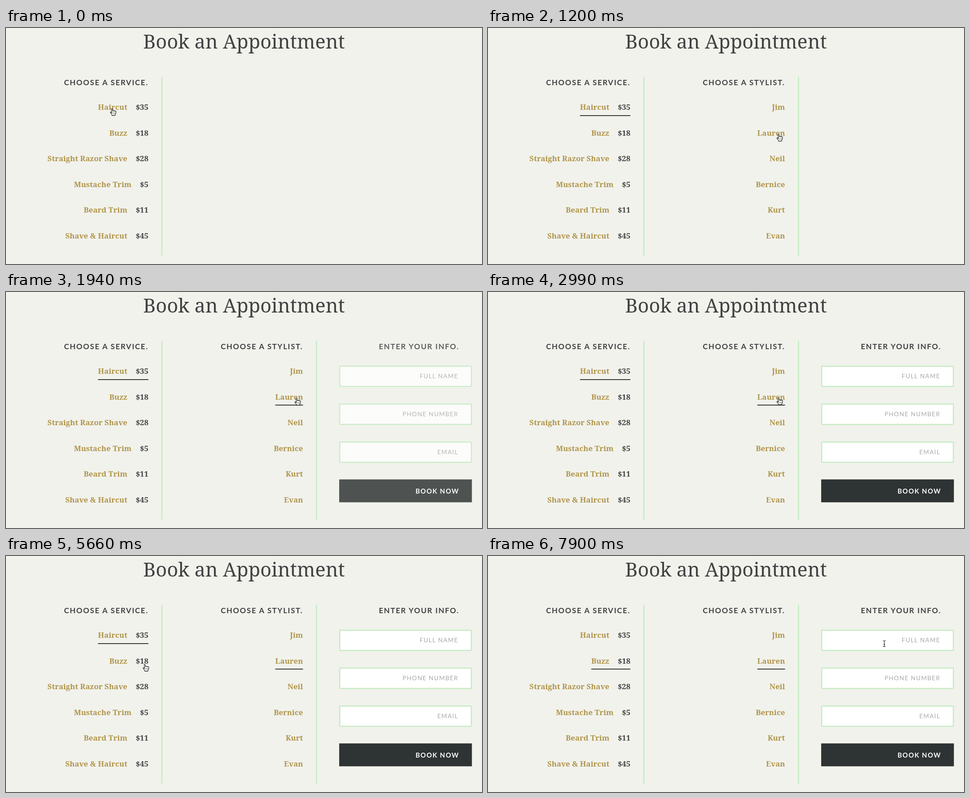
Write an HTML page that moves like this. It is 1060 by 528 pixels and loops after 8000 ms.

```html
<!DOCTYPE html>
<html lang="en">
<head>
<meta charset="utf-8">
<title>Book an Appointment</title>
<style>
  html, body { margin: 0; width: 100%; height: 100%; overflow: hidden; background: #f1f2ec; }
  svg { display: block; width: 1060px; height: 528px; }
  text { fill: #414242; }
  .title { font: 43.1px "Noto Serif", serif; text-anchor: middle; }
  .head, .hint, .button { font-family: Lato, sans-serif; letter-spacing: .1em; text-anchor: end; }
  .head { font-size: 16.8px; font-weight: 700; }
  .hint { font-size: 13.44px; fill: #a9a9a9; }
  .button { font-size: 14.7px; font-weight: 700; fill: #fff; }
  .item, .price { font: 700 16.8px "Noto Serif", serif; text-anchor: end; }
  .item { fill: #b1954b; }
  .rule { fill: #c5ebc3; }
  .field { fill: #fff; stroke: #c5ebc3; stroke-width: 2.5; }
  .under { fill: #393c3c; }
</style>
</head>
<body>
<svg id="stage" viewBox="0 0 1060 528"></svg>
<script>
const LOOP = 8000;
const stage = document.getElementById('stage');

function add(parent, tag, attrs = {}, text = '') {
  const el = document.createElementNS('http://www.w3.org/2000/svg', tag);
  for (const key in attrs) el.setAttribute(key, attrs[key]);
  el.textContent = text;
  return parent.appendChild(el);
}
const group = () => add(stage, 'g');
const label = (parent, cls, x, y, text) => add(parent, 'text', { class: cls, x, y }, text);
const box = (parent, cls, x, y, width, height, more) =>
  add(parent, 'rect', { class: cls, x, y, width, height, ...more });

// A list of choices; returns one underline per row.
function list(parent, right, heading, rows) {
  label(parent, 'head', right, 128, heading);
  box(parent, 'rule', right + 28.8, 109, 2.6, 400);
  return rows.map(([name, price], i) => {
    const y = 183 + i * 57.5;
    const end = price ? right - price.length * 9.4 - 18.7 : right;
    const item = label(parent, 'item', end, y, name);
    if (price) label(parent, 'price', right, y, price);
    const left = end - item.getComputedTextLength();
    return box(parent, 'under', left, Math.floor(y + 12), right - left, 2, { opacity: 0 });
  });
}

label(stage, 'title', 530, 46, 'Book an Appointment');
const services = group(), stylists = group(), info = group();

const [haircut, buzz] = list(services, 317.1, 'CHOOSE A SERVICE.', [
  ['Haircut', '$35'], ['Buzz', '$18'], ['Straight Razor Shave', '$28'],
  ['Mustache Trim', '$5'], ['Beard Trim', '$11'], ['Shave & Haircut', '$45']
]);
const [first, second] = list(stylists, 661.4, 'CHOOSE A STYLIST.',
  [['Jim'], ['Lauren'], ['Neil'], ['Bernice'], ['Kurt'], ['Evan']]);

label(info, 'head', 1009.2, 128, 'ENTER YOUR INFO.');
['FULL NAME', 'PHONE NUMBER', 'EMAIL'].forEach((hint, i) => {
  const y = 164.7 + i * 84.9;
  box(info, 'field', 743.2, y + 1.2, 293.1, 45.4, { rx: 2 });
  label(info, 'hint', 1007.2, y + 28.6, hint);
});
box(info, '', 742, 419.3, 295.5, 51.2, { fill: '#2e3334' });
label(info, 'button', 1009.2, 450.8, 'BOOK NOW');
const caret = box(stage, '', 1005, 180, 1, 16, { fill: '#333' });

const hand = group();
add(hand, 'path', {
  d: 'M-3.2 2L-5 .2C-6.2-1-7.3.6-6.2 1.8L-3 6V7.6H4V6C5.5 4 6 2 6-1C6-2.5 4.2-2.7 3.8-1.6' +
     'C3.6-3.2 1.6-3.2 1.2-2C.9-3.4-1-3.4-1.2-2.2L-2-6.6C-2.3-8.2-4.6-8-4.2-6.2Z',
  fill: '#fff', stroke: '#111', 'stroke-width': 1.1, 'stroke-linejoin': 'round'
});
add(hand, 'path', { d: 'M-.6 1V4.2M1.4 1V4.2M3.4 1V4.2', stroke: '#333', 'stroke-width': .7 });

const beam = group();
for (const [stroke, width] of [['#fff', 2.8], ['#222', 1.2]])
  add(beam, 'path', {
    d: 'M-3-6.5H-1.5Q0-6.5 0-5Q0-6.5 1.5-6.5H3M-3 6.5H-1.5Q0 6.5 0 5Q0 6.5 1.5 6.5H3M0-5V5M-1.5 1.5H1.5',
    fill: 'none', stroke, 'stroke-width': width
  });

// Held pointer positions: time, x, y.
const moves = [
  [0, 239, 188], [600, 262, 195], [750, 420, 224], [900, 600, 247], [1050, 663, 248],
  [1200, 650, 245.5], [2990, 650, 244.5], [3140, 649, 210], [3280, 646, 181],
  [4470, 644, 181], [4760, 645, 186], [4910, 650, 220], [5060, 652, 242],
  [5510, 480, 260], [5660, 312, 250], [5810, 275, 249], [5960, 266, 248],
  [6850, 400, 241], [7000, 760, 210], [7150, 882.5, 196]
];
// The remaining times at which the held picture advances.
const fades = [150, 300, 450, 1790, 1940, 2090, 3870, 4020, 5360, 5510, 6410, 6560];

const latest = (times, t) => Math.max(0, ...times.filter(v => v <= t));
const ramp = (t, start, span) => Math.min(1, Math.max(0, (t - start) / span));
const show = (el, opacity) => el.setAttribute('opacity', opacity);

function draw(now) {
  const t = latest(fades, now);
  const rise = start => ramp(t, start, 200);
  const fall = start => (1 - rise(start)) ** 1.4;

  show(stylists, ramp(t, 1, 400));
  show(info, ramp(t, 1608, 400));
  show(haircut, rise(20) * fall(6280));
  show(buzz, rise(6280));
  show(first, rise(3740) * fall(5230));
  show(second, t < 5360 ? rise(1660) * fall(3740) : rise(5230));
  show(caret, now >= 7450 && now < 7900 ? 1 : 0);

  const [, x, y] = moves.findLast(m => m[0] <= now);
  const inField = x > 742;
  show(hand, inField ? 0 : 1);
  show(beam, inField ? 1 : 0);
  for (const el of [hand, beam]) el.setAttribute('transform', `translate(${x} ${y})`);
}

const began = performance.now();
function tick() {
  draw((performance.now() - began) % LOOP);
  requestAnimationFrame(tick);
}
tick();
</script>
</body>
</html>
```
